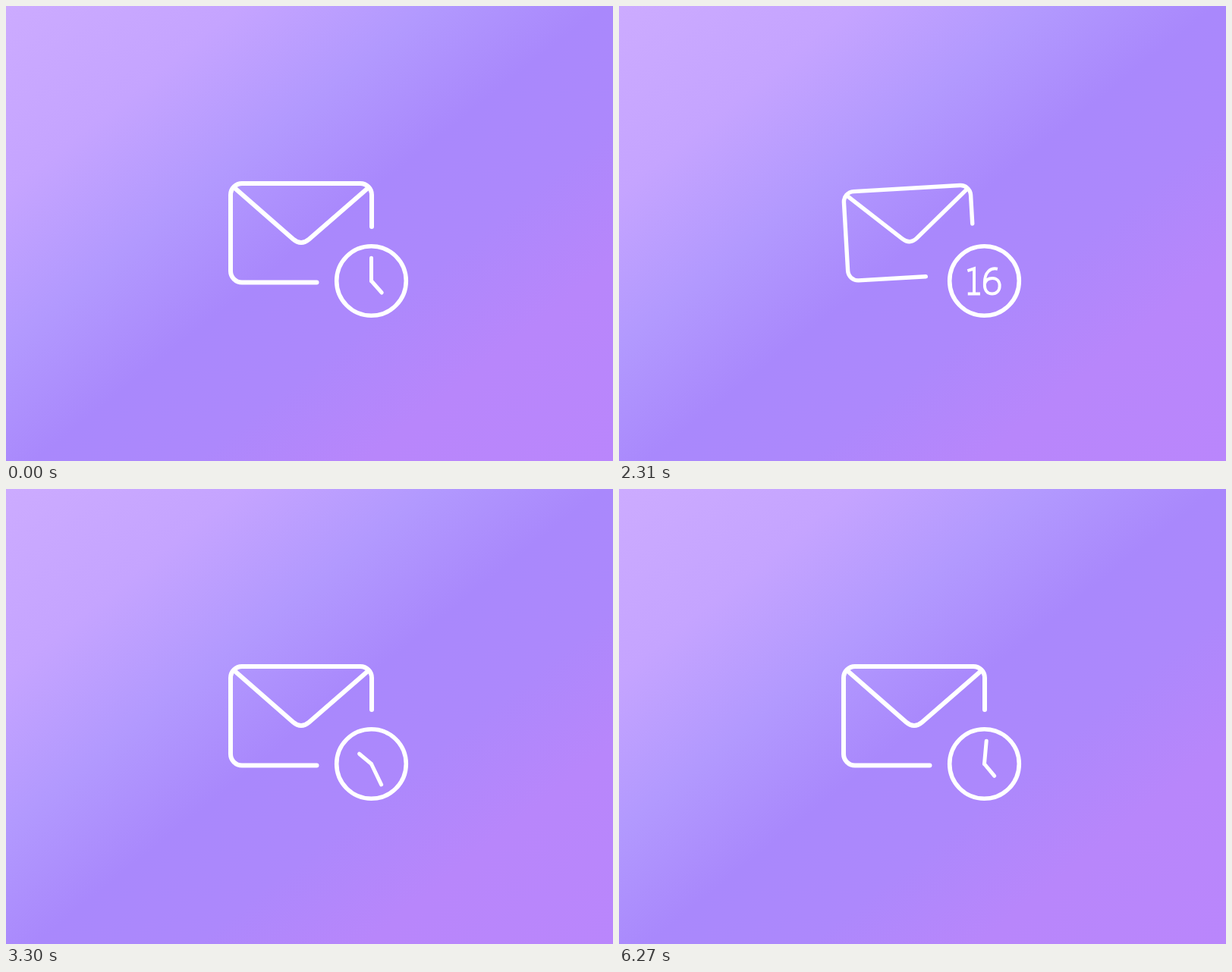
Write an HTML page that moves like this. It is 800 px wide and 600 px high and loops after 6.3 s.

```html
<!DOCTYPE html>
<html lang="en">
<head>
<meta charset="utf-8">
<title>Scheduled mail</title>
<style>
  html, body { margin: 0; width: 100%; height: 100%; overflow: hidden; background: #a987fc; }
  svg { display: block; width: 100vw; height: 100vh; }
  g { fill: none; stroke: #fff; stroke-linecap: round; stroke-linejoin: round; }
  #digits { stroke-linecap: butt; stroke-linejoin: miter; }
</style>
</head>
<body>
<svg viewBox="0 0 800 600">
  <defs>
    <linearGradient id="sky" gradientUnits="userSpaceOnUse" x1="0" y1="0" x2="605" y2="756">
      <stop offset="0" stop-color="#ccabff"/>
      <stop offset=".2" stop-color="#c5a4ff"/>
      <stop offset=".363" stop-color="#b299fe"/>
      <stop offset=".508" stop-color="#a988fc"/>
      <stop offset=".645" stop-color="#ad88fc"/>
      <stop offset=".79" stop-color="#b886fb"/>
      <stop offset="1" stop-color="#ba86fc"/>
    </linearGradient>
  </defs>
  <rect width="800" height="600" fill="url(#sky)"/>

  <!-- envelope, drawn around its own centre -->
  <g id="mail" stroke-width="6">
    <path d="M93-8V-50a15 15 0 0 0-15-15H-78a15 15 0 0 0-15 15V50.5a15 15 0 0 0 15 15H20.5"/>
    <path d="M-87-58.5L-10.5 8.5Q0 17.5 10.5 8.5L87.5-58.5"/>
  </g>

  <g transform="translate(481.5 362.5)">
    <circle r="45.8" stroke-width="5.6"/>
    <g id="hands" stroke-width="5">
      <path id="minute" d="M0 0V-30.3"/>
      <path id="hour" d="M0 0V-20.7"/>
    </g>
    <g id="digits" stroke-width="5">
      <path d="M-28-17L-17-20.5V21.5M-27.5 21.5H-7"/>
      <path id="five" d="M25-14V-20.5H4.5L2.5 0C6-3.5 9.5-4.5 13-4.5C20-4.5 25.5.5 25.5 8.5C25.5 16.5 20 21.5 12.5 21.5C5 21.5.5 17 .5 11"/>
      <path id="six" d="M22-20C10-22.5.5-14.5.5 3V7C.5 16 5.5 21.5 13 21.5C20.5 21.5 25.5 16 25.5 8.5C25.5.5 20.5-4.5 13.5-4.5C7-4.5 2-1 .5 5"/>
    </g>
  </g>
</svg>
<script>
const LOOP = 6300, STEP = 30, REST = 0.79;
const el = id => document.getElementById(id);
const [mail, hands, minute, hour, digits, five, six] =
  ['mail', 'hands', 'minute', 'hour', 'digits', 'five', 'six'].map(el);

const linear = u => u;
const easeIn = u => u * u * u;
const easeOut = u => 1 - (1 - u) ** 3;
const easeInOut = u => u * u * (3 - 2 * u);

// progress of t from a to b, eased
const ramp = (t, a, b, ease = linear) => ease(Math.min(1, Math.max(0, (t - a) / (b - a))));
const mix = (a, b, u) => a + (b - a) * u;
const set = (node, transform) => node.setAttribute('transform', transform);
const show = (node, on) => node.setAttribute('display', on ? 'inline' : 'none');

function drawHands(t) {
  const size = t < 1500
    ? 1 - ramp(t, 690, 870, easeIn)
    : ramp(t, 2640, 2820, easeOut);
  show(hands, size > 0);
  set(hands, `scale(${size})`);
  set(minute, `rotate(${-1080 * t / LOOP})`);
  set(hour, `rotate(${138.5 - 360 * t / LOOP})`);
}

function drawDigits(t) {
  let size;
  if (t < 1170) size = ramp(t, 870, 1140, easeOut);
  else if (t < 1980) size = mix(1, REST, ramp(t, 1170, 1680, easeOut));
  else if (t < 2100) size = mix(REST, 1, ramp(t, 1980, 2100, easeOut));
  else size = mix(1, REST, ramp(t, 2100, 2340, easeOut)) * (1 - ramp(t, 2490, 2670, easeIn));
  show(digits, size > 0);
  show(five, t < 1980);
  show(six, t >= 1980);
  set(digits, `scale(${size})`);
}

function drawMail(t) {
  let x, size, turn, alpha = 1, blur = 0;
  if (t < 2910) {
    const pull = ramp(t, 2190, 2650, easeInOut);
    const fling = ramp(t, 2650, 2850, easeIn);
    x = mix(-38 * pull, 540, fling);
    size = mix(1, 0.9, ramp(t, 2070, 2310, easeInOut));
    turn = mix(-19.5 * pull, 6, fling);
  } else {
    const left = 1 - ramp(t, 2940, 3330, easeOut);
    x = -5 * left;
    size = 1 + 0.08 * left;
    turn = 11 * left;
    alpha = ramp(t, 2940, 3045);
    blur = 1.8 * left;
  }
  set(mail, `translate(${389 + x} 299) rotate(${turn}) scale(${size})`);
  mail.style.opacity = alpha;
  mail.style.filter = blur > 0.02 ? `blur(${blur}px)` : 'none';
}

function frame() {
  const t = Math.floor(performance.now() % LOOP / STEP) * STEP;
  drawHands(t);
  drawDigits(t);
  drawMail(t);
  requestAnimationFrame(frame);
}
frame();
</script>
</body>
</html>
```
